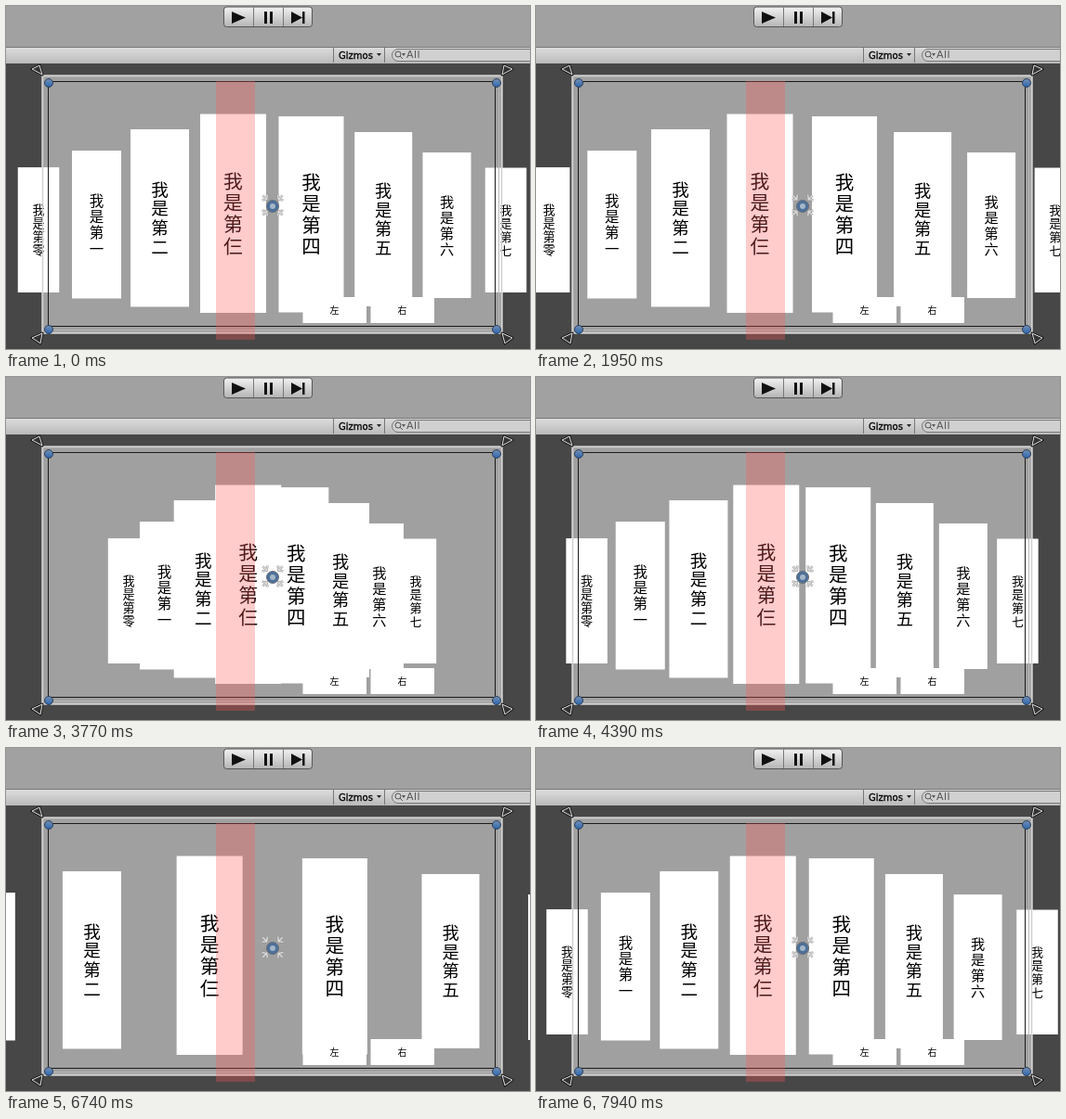
Recreate the animation shown at these times as an HTML page. Size 564 by 370 pixels, loop 8 s.

```html
<!DOCTYPE html>
<html lang="zh-CN">
<head>
<meta charset="utf-8">
<title>Card spread</title>
<style>
html, body { margin: 0; width: 564px; height: 370px; overflow: hidden; background: #a0a0a0; }
svg { display: block; }
text { font-family: "Noto Sans CJK SC", "Noto Sans CJK JP", sans-serif; text-anchor: middle; }
.ui { font-family: "DejaVu Sans", sans-serif; text-anchor: start; }
.line { fill: none; }
</style>
</head>
<body>
<svg width="564" height="370" viewBox="0 0 564 370">
  <defs>
    <linearGradient id="bar" x2="0" y2="1"><stop stop-color="#dedede"/><stop offset="1" stop-color="#bababa"/></linearGradient>
    <linearGradient id="key" x2="0" y2="1"><stop stop-color="#f2f2f2"/><stop offset="1" stop-color="#b4b4b4"/></linearGradient>
    <linearGradient id="ball" x2="0" y2="1"><stop stop-color="#7490b4"/><stop offset="1" stop-color="#2c66ae"/></linearGradient>
    <path id="wedges" d="M39 74L28 68L36 64ZM534 74L536 64L545 68ZM39 353L28 358L37 364ZM534 353L545 358L537 364Z"/>
  </defs>

  <!-- Play controls -->
  <rect width="564" height="44" fill="#a1a1a1"/>
  <rect x="234.5" y="1" width="95" height="21.500" rx="3" fill="url(#key)" stroke="#555"/>
  <path d="M266.5 1.500V22M298.5 1.500V22" stroke="#777"/>
  <path d="M243 6L258 12.500L243 19ZM278 6h3v13h-3zM284 6h3v13h-3zM307 6L319 12.500L307 19ZM319 6h2.500v13h-2.500z" fill="#111"/>

  <!-- Toolbar -->
  <rect y="44" width="564" height="18" fill="url(#bar)"/>
  <path d="M0 44.500H564" stroke="#777"/>
  <path d="M352.500 45V61M407.500 45V61" stroke="#777"/>
  <text class="ui" x="358" y="57" font-size="10" stroke="#000" stroke-width=".3">Gizmos</text>
  <path d="M399 51h5l-2.500 3z" fill="#222"/>
  <rect x="415.500" y="46.500" width="170" height="13" rx="6.500" fill="#d0d0d0" stroke="#777"/>
  <g stroke="#555" class="line"><circle cx="422" cy="52" r="3"/><path d="M424 54l3 3"/></g>
  <path d="M426 51h4l-2 3z" fill="#555"/>
  <text class="ui" x="431" y="56" font-size="11" letter-spacing=".5" fill="#555">All</text>

  <!-- Scene -->
  <rect y="62" width="564" height="308" fill="#474747"/>
  <rect x="38" y="74" width="497" height="280" fill="#a0a0a0"/>
  <g id="cards" fill="#fff"></g>
  <g class="line">
    <rect x="39.500" y="75.500" width="494" height="277" stroke="#d0d0d0" stroke-width="1.500"/>
    <path d="M46 349.500H530.500V83" stroke="#b8b8b8"/>
    <rect x="45.500" y="81.500" width="481" height="264" stroke="#1c1a18"/>
  </g>
  <g fill="#333" stroke-linejoin="round">
    <use href="#wedges" stroke="#1a1a1a" stroke-width="3"/>
    <use href="#wedges" stroke="#ddd"/>
  </g>
  <g id="handles" fill="url(#ball)" stroke="#2f4058"></g>
  <g id="buttons"></g>

  <!-- Centre gizmo -->
  <g id="gizmo" class="line" transform="translate(287 215)"></g>
  <circle cx="287" cy="216" r="6.500" fill="#4d7099" stroke="#6a7078"/>
  <circle cx="287" cy="216" r="3" fill="#a4b6c8"/>

  <rect x="226" y="81" width="42" height="279" fill="#f55" fill-opacity=".3"/>
</svg>
<script>
const $ = id => document.getElementById(id);
const MID = 286.5, LOOP = 8000;

// Each card: last character, offset from the middle, width, top, bottom
const cards = [
  ['零', -251.5, 44.5, 174, 309], ['一', -189, 53, 156, 315.5],
  ['二', -121, 63, 133, 324.5], ['仨', -42, 71, 116.5, 331],
  ['四', 42, 70, 119, 330.5], ['五', 119.7, 62, 136, 324],
  ['六', 188, 52, 158, 315], ['七', 251.5, 44.5, 174.5, 309]
];

$('cards').innerHTML = cards.map(([last, , w, top, bottom]) => {
  const h = bottom - top, size = h * .097;
  const text = [...'我是第' + last].map((c, i) => {
    const y = (top + bottom) / 2 + (i - 1.5) * h * .1085 + size * .38;
    return `<text y="${y}" font-size="${size}" fill="#000">${c}</text>`;
  }).join('');
  return `<g><rect x="${-w / 2}" y="${top}" width="${w}" height="${h}"/>${text}</g>`;
}).join('');

$('handles').innerHTML = [46, 528].flatMap(x => [83, 349].map(y =>
  `<circle cx="${x}" cy="${y}" r="4.5"/>`)).join('');

$('buttons').innerHTML = [['左', 319.5], ['右', 392.5]].map(([c, x]) =>
  `<rect x="${x}" y="314" width="68.500" height="28" fill="#fff"/>
   <text x="${x + 34}" y="332" font-size="10">${c}</text>`).join('');

const arm = 'M-4 -12L0 -9L4 -12M0 -8V-15';
$('gizmo').innerHTML = [45, 135, 225, 315].map(a =>
  `<g transform="rotate(${a})"><path d="${arm}" stroke="#888" stroke-width="2.500"/>
   <path d="${arm}" stroke="#ddd" stroke-width="1.500"/></g>`).join('');

// Spread over time: time, spread, slope per ms
const keys = [
  [1210, 1, 0], [1930, 1.083, .0003], [2730, 1.469, 0], [3770, .614, 0],
  [4600, 1.024, 0], [5130, .983, 0], [6310, .983, 0],
  [6716, 1.604, 0], [7940, 1.006, 0]
];

function spread(t) {
  if (t <= keys[0][0]) return keys[0][1];
  const i = keys.findIndex(k => t <= k[0]);
  if (i < 0) return keys.at(-1)[1];
  const [t0, a, m0] = keys[i - 1], [t1, b, m1] = keys[i];
  const d = t1 - t0, u = (t - t0) / d, v = 1 - u;
  return a * v * v * (1 + 2 * u) + b * u * u * (3 - 2 * u) + d * u * v * (m0 * v - m1 * u);
}

// The picture refreshes in steps of about 80 ms while moving
function stepped(t) {
  if (t < 1290) return 0;
  const [start, step] = t < 6390 ? [1290, 80] : [6390, 1550 / 19];
  const time = start + Math.floor((t - start) / step + 1e-6) * step;
  return t < 6390 ? Math.min(time, 5130) : time;
}

const groups = [...$('cards').children];
const begin = performance.now();

function draw() {
  const s = spread(stepped((performance.now() - begin) % LOOP));
  groups.forEach((g, i) => g.setAttribute('transform', `translate(${MID + cards[i][1] * s} 0)`));
  requestAnimationFrame(draw);
}
draw();
</script>
</body>
</html>
```
